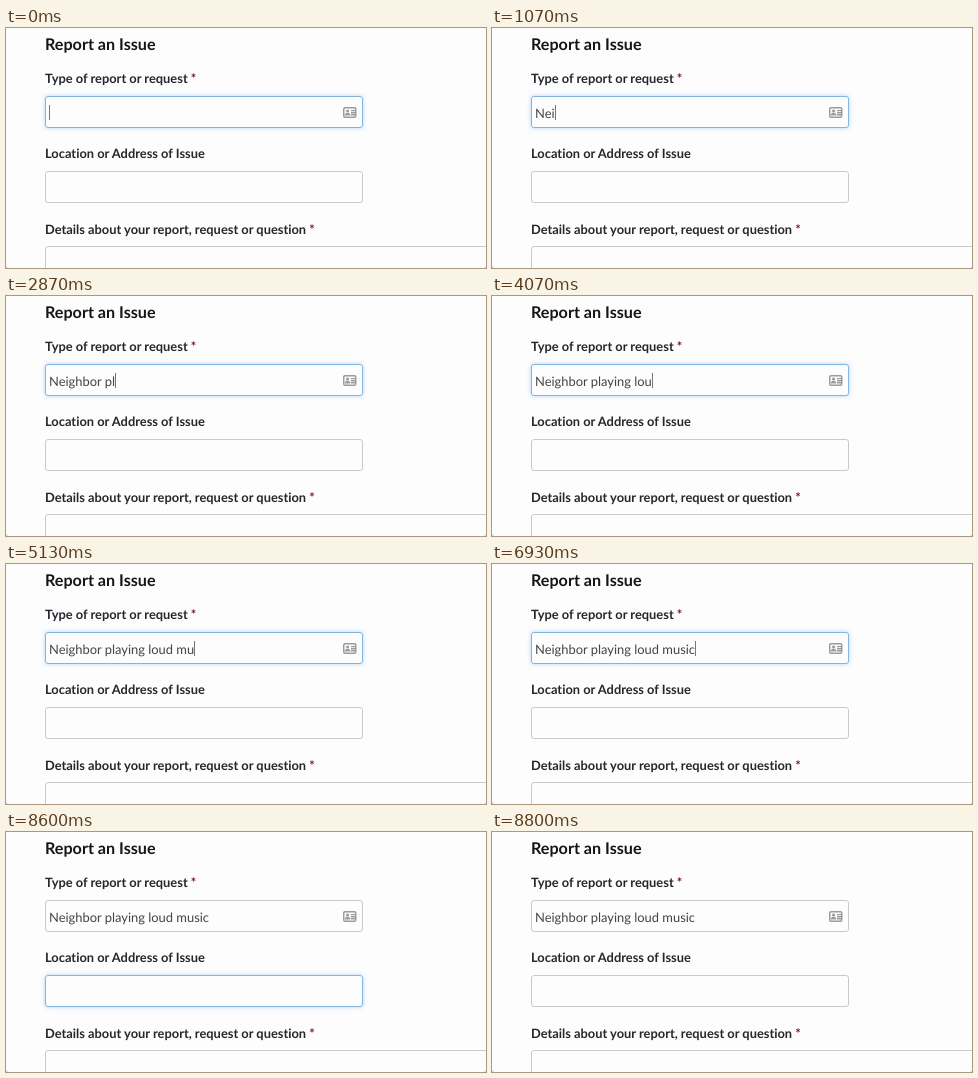
Write an HTML page that moves like this. It is 480 px wide and 240 px high and loops after 9.34 s.

```html
<!DOCTYPE html>
<html lang="en">
<head>
<meta charset="utf-8">
<title>Report form</title>
<style>
  html, body { margin: 0; width: 480px; height: 240px; overflow: hidden; background: #c4c4c6; }
  main { position: relative; width: 480px; height: 240px; overflow: hidden; background: #fefdfe;
    border-radius: 0 0 3px 3px; font: 12.92px/16px Lato, sans-serif; color: #26272c;
    text-rendering: geometricPrecision; font-variant-ligatures: none; }
  main > * { position: absolute; left: 39px; margin: 0; white-space: pre; }
  h1 { top: 7px; font-size: 16.15px; line-height: 20px; color: #141518; }
  label { font-size: 12.87px; font-weight: bold; }
  label b { color: #74141c; }
  .field { box-sizing: border-box; width: 318px; height: 32px; border: 1px solid;
    border-radius: 3px; border-color: #cac9cf; background: #fefdfe; }
  .entry { position: absolute; left: 3px; top: 8px; height: 16px; color: #444; }
  .caret { position: absolute; left: 100%; top: 0; width: 1px; height: 15px; background: #777; }
  svg { position: absolute; left: 297px; top: 9.5px; }
</style>
</head>
<body>
<main>
  <h1>Report an Issue</h1>
  <label style="top:42px">Type of report or request <b>*</b></label>
  <div class="field" style="top:68px"><span class="entry"><span class="text"></span><i class="caret"></i></span><svg width="14" height="11" fill="#9c9c9c"><rect x=".75" y=".75" width="12" height="9.5" rx="1.2" fill="none" stroke="#9c9c9c" stroke-width="1.5"/><circle cx="4.6" cy="4" r="1.6"/><path d="M1.8 8.6q0-2.8 2.8-2.8t2.8 2.8zM8 2.9h4v1.4H8zM8 5h4v1.4H8zM8 7.1h4v1.4H8z"/></svg></div>
  <label style="top:117px">Location or Address of Issue</label>
  <div class="field" style="top:143px"><span class="entry"><i class="caret"></i></span></div>
  <label style="top:193px">Details about your report, request or question <b>*</b></label>
  <div class="field" style="top:218px;width:480px;height:60px"></div>
</main>
<script>
const LOOP = 9340, STEP = 1000 / 15, FADE = 150;
const PHRASE = 'Neighbor playing loud music';
const keyTimes = [110, 980, 1020, 1650, 1790, 1920, 2050, 2190, 2520, 2650, 2860, 2920, 3060, 3190,
  3260, 3390, 3520, 3720, 3920, 4060, 4120, 4260, 4660, 5120, 5660, 5790, 5910];
const SWITCH = 7920, LEAVE = 8650;

const text = document.querySelector('.text');
const carets = document.querySelectorAll('.caret');
const fields = document.querySelectorAll('.field');

const mix = (a, b, k) => a + (b - a) * k;
const ease = (t, start) => {
  const k = Math.min(1, Math.max(0, (t - start) / FADE));
  return k * k * (3 - 2 * k);
};

function setFocus(field, k) {
  const rgb = [[202, 128], [201, 182], [207, 224]].map(([a, b]) => mix(a, b, k));
  field.style.borderColor = `rgb(${rgb})`;
  field.style.boxShadow = `0 0 4px rgba(102,175,233,${0.5 * k})`;
}

function showCaret(caret, focused, elapsed) {
  caret.style.visibility = focused && elapsed % 1000 < 500 ? 'visible' : 'hidden';
}

function draw(time) {
  const t = Math.floor((time % LOOP + 7) / STEP) * STEP;
  const typed = keyTimes.filter(key => key <= t).length;
  text.textContent = PHRASE.slice(0, typed);
  showCaret(carets[0], t < SWITCH, t - (keyTimes[typed - 1] || 0));
  showCaret(carets[1], t >= SWITCH && t < LEAVE, t - SWITCH);
  const switched = ease(t, SWITCH);
  setFocus(fields[0], 1 - switched);
  setFocus(fields[1], switched - ease(t, LEAVE));
}

const start = performance.now();
function tick() {
  draw(performance.now() - start);
  requestAnimationFrame(tick);
}
draw(0);
requestAnimationFrame(tick);
</script>
</body>
</html>
```
